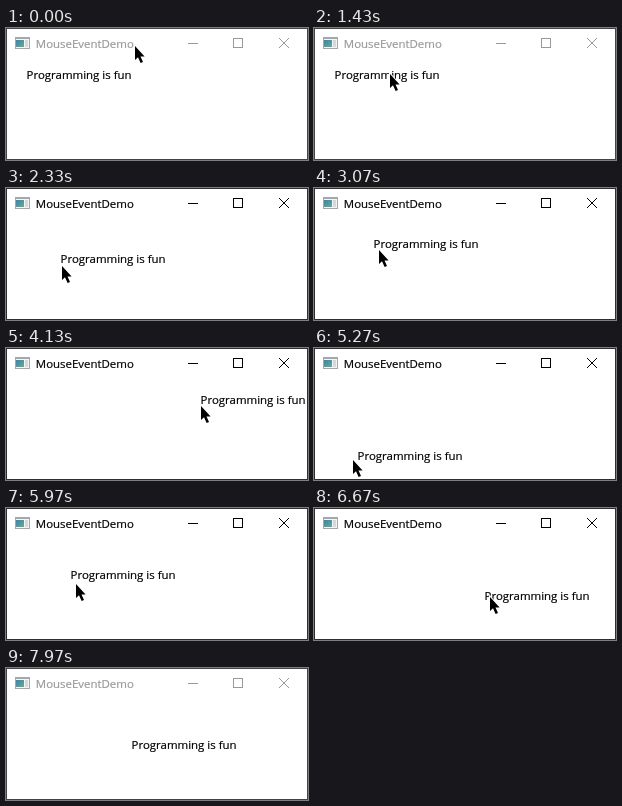
Recreate the animation shown at these times as an HTML page with a canvas. Size 302x132 px, loop 8130 ms.

```html
<!DOCTYPE html>
<html lang="en">
<head>
<meta charset="utf-8">
<title>MouseEventDemo</title>
<style>
  html, body { margin: 0; overflow: hidden; background: #fff; }
  canvas { display: block; }
</style>
</head>
<body>
<canvas id="stage" width="302" height="132"></canvas>
<script>
const ctx = document.getElementById('stage').getContext('2d');
const LOOP = 8130, PRESS = 1830, RELEASE = 7180, BLUR = 7965, LAG = 35;
const FONT = '11.45px "Open Sans", "Noto Sans", sans-serif';

// Turning points of the hand, as [time, position] for each axis
const pathX = [
  [1035, 129], [1585, 64], [1800, 64], [2250, 55], [2540, 60], [2640, 60],
  [2830, 36], [3070, 65], [4120, 195], [4300, 160], [5270, 39], [5430, 17],
  [5970, 70], [6670, 176], [6780, 178], [RELEASE, 126], [7400, 97]
];
const pathY = [
  [1035, 18], [1585, 53], [1800, 53], [2330, 78], [2540, 82], [2640, 82],
  [3050, 62], [3640, 106], [4110, 58], [4280, 58], [5100, 116], [5270, 112],
  [5720, 64], [6460, 110], [6670, 89], [6810, 66], [RELEASE, 83], [7400, 136]
];

// Flat at turning points and rests, average speed elsewhere
function slope(keys, i) {
  const a = keys[i - 1], b = keys[i], c = keys[i + 1];
  if (!a || !c || (b[1] - a[1]) * (c[1] - b[1]) <= 0) return 0;
  return (c[1] - a[1]) / (c[0] - a[0]);
}

function along(keys, time) {
  const t = Math.min(Math.max(time, keys[0][0]), keys[keys.length - 1][0]);
  const i = Math.max(1, keys.findIndex(k => k[0] >= t));
  const [t0, p0] = keys[i - 1], [t1, p1] = keys[i];
  const span = t1 - t0, u = (t - t0) / span, v = 1 - u;
  return Math.round(
    v * v * (1 + 2 * u) * p0 + u * u * (1 + 2 * v) * p1 +
    span * u * v * (v * slope(keys, i - 1) - u * slope(keys, i)));
}

const pointer = t => [along(pathX, t), along(pathY, t)];

function rect(color, x, y, w, h) {
  ctx.fillStyle = color;
  ctx.fillRect(x, y, w, h);
}

function text(str, x, y, color) {
  ctx.font = FONT;
  ctx.fillStyle = ctx.strokeStyle = color;
  ctx.lineWidth = 0.2;
  ctx.fillText(str, x, y);
  ctx.strokeText(str, x, y);
}

function drawIcon() {
  rect('#a3a8ab', 9, 9, 15, 12);
  rect('#f4f6f6', 10, 11, 13, 9);
  const blue = ctx.createLinearGradient(10, 11, 17, 20);
  blue.addColorStop(0, '#3f7cae');
  blue.addColorStop(1, '#5fb09a');
  rect(blue, 10, 12, 8, 7);
  rect('#d3d8da', 19, 12, 3, 7);
}

function drawWindow(active) {
  const ink = active ? '#000' : '#999';
  rect('#fff', 0, 0, 302, 132);
  drawIcon();
  text('MouseEventDemo', 29.8, 20, ink);
  rect(ink, 182, 15, 10, 1);
  ctx.strokeStyle = ink;
  ctx.lineWidth = 1;
  ctx.strokeRect(227.5, 10.5, 9, 9);
  ctx.stroke(new Path2D('M273 10L283 20M283 10L273 20'));
}

function drawBorder(active) {
  ctx.strokeStyle = active ? '#2e2e2e' : '#444';
  ctx.lineWidth = 1;
  ctx.strokeRect(0.5, 0.5, 301, 131);
}

const arrow = new Path2D('M0 0V14L3 11.2L5.6 17L8 16L5.5 10.4H9.6Z');

function drawPointer([x, y]) {
  ctx.save();
  ctx.translate(x, y);
  ctx.strokeStyle = '#fff';
  ctx.lineWidth = 2;
  ctx.stroke(arrow);
  ctx.fillStyle = '#000';
  ctx.fill(arrow);
  ctx.restore();
}

function draw(now) {
  // The screen updates 30 times a second
  const t = Math.floor((now % LOOP) * 0.03 + 0.15) / 0.03;
  const active = t >= PRESS && t < BLUR;
  drawWindow(active);
  const [x, y] = t < PRESS ? [21, 53]
    : pointer(Math.min(RELEASE, Math.max(PRESS, t - LAG)));
  text('Programming is fun', x - 0.4, y - 2, '#000');
  drawPointer(pointer(t));
  drawBorder(active);
}

const start = performance.now();
function tick() {
  draw(performance.now() - start);
  requestAnimationFrame(tick);
}
tick();
</script>
</body>
</html>
```
